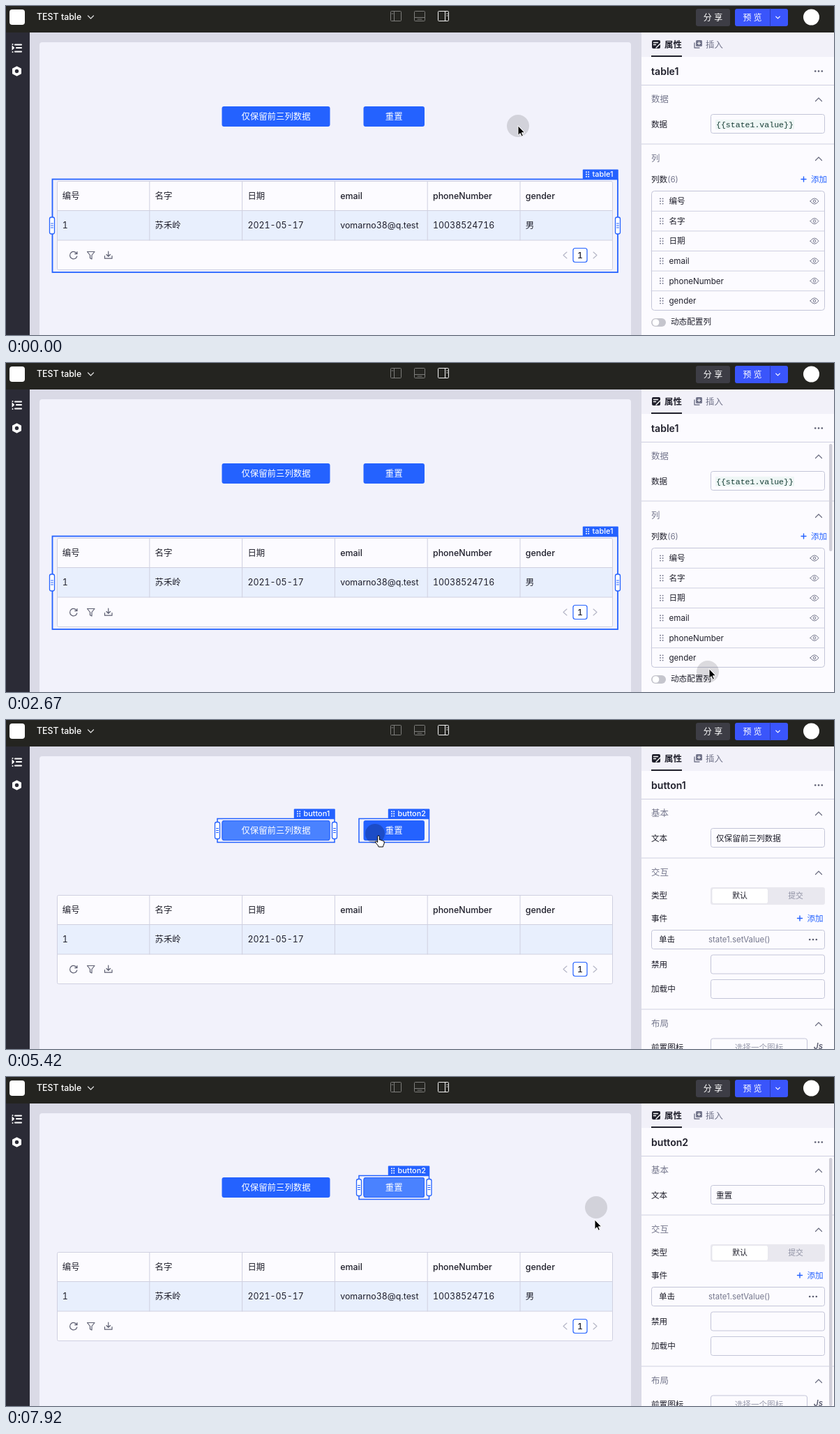
These frames come from a looping animation (1187x472 px, 8000 ms). An HTML page:

```html
<!DOCTYPE html>
<html lang="zh">
<head>
<meta charset="utf-8">
<title>TEST table</title>
<style>
html, body { margin: 0; width: 100%; height: 100%; overflow: hidden; background: #dadae6; }
svg { display: block; width: 100vw; height: 100vh; }
text { font-family: Inter, "Noto Sans CJK SC", "Noto Sans CJK", sans-serif; white-space: pre; }
.num { font-feature-settings: "tnum"; }
.mono { font-family: "Liberation Mono", monospace; }
</style>
</head>
<body>
<svg id="stage" viewBox="0 0 1187 472"></svg>
<script>
const BLUE = '#2462ff', LIGHT = '#4a82ff', INK = '#1f1f2b', GREY = '#74768c', LINE = '#cfd0e0', WHITE = '#fcfbff';
const range = n => [...Array(n).keys()];

const rect = (x, y, w, h, fill, r = 0, stroke = 'none', sw = 1, more = '') =>
  `<rect x="${x}" y="${y}" width="${w}" height="${h}" rx="${r}" fill="${fill}" stroke="${stroke}" stroke-width="${sw}" ${more}/>`;
const path = (d, stroke, sw = 1.2, fill = 'none') =>
  `<path d="${d}" stroke="${stroke}" stroke-width="${sw}" fill="${fill}" stroke-linecap="round" stroke-linejoin="round"/>`;
const line = (x1, y1, x2, y2, c = LINE) => path(`M${x1} ${y1}L${x2} ${y2}`, c, 1);
const dot = (x, y, r, fill) => `<circle cx="${x}" cy="${y}" r="${r}" fill="${fill}"/>`;
// y is the middle of the capitals
const text = (x, y, s, size = 11.6, fill = INK, weight = 400, more = '') =>
  `<text x="${x}" y="${y + size * 0.36}" font-size="${size}" fill="${fill}" font-weight="${weight}" ${more}>${s}</text>`;
const MID = 'text-anchor="middle"';
const group = (id, ...parts) => `<g id="${id}">${parts.join('')}</g>`;

const grip = (x, y, c, gap = 3.6) =>
  range(6).map(i => dot(x + (i % 2) * gap, y + ((i >> 1) - 1) * gap, 0.95, c)).join('');
const chevron = (x, y, c, dx, dy) => path(`M${x - dx} ${y - dy}l${dx} ${dy * 2}l${dx} ${-dy * 2}`, c);
const sideChevron = (x, dir) => path(`M${x - 2.5 * dir} 353l${5 * dir} 4.5l${-5 * dir} 4.5`, '#b4b5c6', 1.1);
const more = (x, y) => range(3).map(i => dot(x + (i - 1) * 4.8, y, 1.3, '#5a5c70')).join('');
const field = (y, h = 28, w = 164, x = 1010) => rect(x + .5, y + .5, w - 1, h - 1, WHITE, 3, '#c3c5d8');
const section = (y, s) => text(925, y, s, 12.4, GREY, 500) + path(`M1160.500 ${y + 2.500}l4.500 -4.500l4.500 4.500`, '#6a6c80');
const add = (x, y) => path(`M${x} ${y}h7M${x + 3.5} ${y - 3.5}v7`, BLUE, 1.4) + text(x + 14, y, '添加', 11.6, BLUE);
const handle = (x, y) => rect(x - 3.5, y - 12, 7, 24, '#fff', 2.5, BLUE, 1.3) +
  range(3).map(i => line(x - 1.5, y - 3 + i * 3, x + 1.5, y - 3 + i * 3, BLUE)).join('');
const frame = (x, y, w, h, tagW, name, sw) =>
  rect(x, y, w, h, 'none', 0, BLUE, sw) + rect(x + w - tagW + .8, y - 14, tagW, 14, BLUE, 1) +
  grip(x + w - tagW + 6, y - 7, '#fff', 3.2) + text(x + w - tagW + 14.500, y - 7, name, 10.900, '#fff', 500);

const topBar = () => rect(0, 0, 1187, 38, '#242420') +
  rect(5, 5, 22, 22, '#fff', 4) +
  text(44, 16, 'TEST table', 12.4, '#fff', 500) + chevron(121.500, 16, '#ddd', 4, 2) +
  rect(551.5, 7.5, 15, 14, 'none', 1, '#7d7d7b') + line(556.5, 8, 556.5, 21, '#7d7d7b') + line(553, 11, 555, 11, '#7d7d7b') +
  rect(585.5, 7.5, 15, 14, 'none', 1, '#7d7d7b') + line(586, 16.5, 600, 16.5, '#7d7d7b') + line(590, 19, 596, 19, '#7d7d7b') +
  rect(619.5, 7.5, 15, 14, 'none', 1, '#f2f2f2') + line(629.5, 8, 629.5, 21, '#f2f2f2') +
  line(632, 11, 633, 11, '#f2f2f2') + line(632, 14, 633, 14, '#f2f2f2') +
  rect(989, 4, 49, 25, '#3d3d45', 3) + text(1013.500, 16.500, '分 享', 12, '#fff', 400, MID) +
  rect(1045, 4, 76, 25, '#3a55fb', 3) + line(1095.5, 4, 1095.5, 29, '#2a3bb8') +
  text(1070, 16.500, '预 览', 12, '#fff', 500, MID) + chevron(1106.500, 16.500, '#fff', 2.800, 1.400) +
  dot(1154.500, 16, 11.500, '#fff');

const rail = () => rect(0, 38, 34, 434, '#2b2b36') +
  path('M13 55.500h9M15 60h7M13 65.500h9', '#fff', 2.1) + path('M9 57l3 3l-3 3z', '#fff', .6, '#fff') +
  dot(9.500, 55, 1, '#fff') + dot(9.500, 66, 1, '#fff') +
  path('M15.500 87l5.800 3.200v6.600l-5.800 3.200l-5.800 -3.200v-6.600z', '#fff', 1.4, '#fff') + dot(15.500, 93.500, 2.700, '#2b2b36');

const button = (id, x, w, s) => rect(x, 144, w, 29, BLUE, 3) +
  rect(x + .5, 144.5, w - 1, 28, LIGHT, 3, BLUE, 1, `id="${id}Glow"`) + text(x + w / 2, 158.500, s, 12.4, '#fff', 400, MID);

const heads = ['编号', '名字', '日期', 'email', 'phoneNumber', 'gender'];
const cells = ['1', '苏禾岭', '2021-05-17', 'vomarno38@q.test', '10038524716', '男'];
const colX = i => 73 + i * 132.8;
const cell = (s, i) => text(colX(i) + 7.800, 315, s, 12.4, INK, 400, 'class="num"');
const table = () => rect(73.5, 251.5, 796, 127, WHITE, 2, LINE) + rect(74, 293.5, 795, 42.5, '#e8effd') +
  line(74, 293.5, 869, 293.5) + line(74, 336, 869, 336) +
  range(5).map(i => line(colX(i + 1), 252, colX(i + 1), 336)).join('') +
  heads.map((s, i) => text(colX(i) + 7.800, 272.500, s, 12.4, INK, 500)).join('') +
  cells.slice(0, 3).map(cell).join('') +
  group('extra', ...cells.slice(3).map((s, i) => cell(s, i + 3))) +
  path('M101.500 355.500a5.200 5.200 0 1 0 .3 3.500M102 352.500v3.200h-3.200', '#5d5f72') +
  path('M116.500 352.500h10.500l-4 5v5.500l-2.500 -1.300v-4.200z', '#5d5f72') +
  path('M141.500 358.500v3.700h10.500v-3.700M146.750 352v7M144 356.500l2.750 2.750l2.750 -2.750', '#5d5f72') +
  sideChevron(801.500, -1) + sideChevron(844.500, 1) +
  rect(813, 347.500, 20, 20, '#fff', 3, BLUE, 1.2) + text(823, 357.500, '1', 12.2, INK, 500, MID + ' class="num"');

const eye = y => path(`M1153 ${y}q6 -8.400 12 0q-6 8.400 -12 0z`, '#74768c', 1) +
  `<circle cx="1159" cy="${y}" r="1.800" fill="none" stroke="#74768c"/>`;
const listRow = (s, i) => {
  const y = 280 + i * 28.600;
  return (i ? line(925, y - 14.300, 1173, y - 14.300) : '') + grip(938, y, '#74768c') + text(950.500, y, s) + eye(y);
};
const tablePanel = () => section(134, '数据') + text(925, 169.500, '数据') + field(155) +
  rect(1017, 163, 113, 14, '#eef6f5') + text(1018, 169.500, '{{state1.value}}', 11.55, '#163d35', 400, 'class="mono"') +
  line(911, 198, 1187, 198) + section(219, '列') +
  text(925, 248.500, `列数<tspan fill="${GREY}">(6)</tspan>`) + add(1140, 248.500) +
  rect(925.5, 265.5, 248, 171, WHITE, 4, '#c3c5d8') + heads.map(listRow).join('') +
  rect(925, 448, 21, 12, '#c5c5cd', 6) + dot(931.500, 454, 4.800, '#fff') + text(953, 452.500, '动态配置列');

const buttonPanel = () => section(134, '基本') + text(925, 169.500, '文本') + field(155) +
  text(1018, 169.500, '', 11.6, INK, 400, 'id="label"') + line(911, 198, 1187, 198) +
  section(219, '交互') + text(925, 252, '类型') +
  rect(1010, 240, 164, 25, '#e9e8ef', 3) + rect(1012, 241.500, 80.500, 22, '#fff', 3, '#dddde6', .6) +
  text(1052, 252.500, '默认', 10.800, INK, 500, MID) + text(1132, 252.500, '提交', 10.800, '#9092a4', 400, MID) +
  text(925, 284.500, '事件') + add(1134.500, 284.500) +
  field(301, 28, 249, 925) + text(936, 315, '单击') + text(1007, 315, 'state1.setValue()', 11.4, GREY) + more(1157, 315) +
  text(925, 350.500, '禁用') + field(336.500) + text(925, 386, '加载中') + field(372) +
  line(911, 415, 1187, 415) + section(436, '布局') +
  text(925, 470, '前置图标') + field(456.500, 28, 139) + text(1079.500, 470, '选择一个图标', 11.6, '#9a9cad', 400, MID) +
  text(1158, 468, 'Js', 11.500, '#5a5c70', 600, 'font-style="italic"');

const panel = () => rect(911, 38, 276, 434, WHITE) + rect(911, 38, 276, 35, '#f2f1f9') +
  rect(926, 49, 12, 12, INK, 2) + path('M928.500 52.500h6M928.500 55.500h3M932 60l6 -6', '#fff', 1.4) +
  text(944, 55.500, '属性', 12.4, INK, 700) + rect(925, 71, 44, 2, INK) +
  path('M987 53v7h7', GREY, 1.4) + rect(989, 49, 9, 9, GREY, 1.500) + path('M991.500 53.500h4M993.500 51.500v4', '#fff', 1.1) +
  text(1003, 55.500, '插入', 12.4, GREY) +
  text(925, 93.500, '', 14.1, INK, 600, 'id="title"') + more(1165, 93.500) + line(911, 113.5, 1187, 113.5) +
  group('tablePanel', tablePanel()) + group('buttonPanel', buttonPanel()) +
  rect(1180, 116, 4.500, 154, '#cfced8', 2.200, 'none', 1, 'id="bar"');

const stage = document.getElementById('stage');
stage.innerHTML = rect(0, 0, 1187, 472, '#dadae6') + rect(48, 52, 848, 440, '#f2f2fb', 4) +
  rail() + table() + button('b1', 309.500, 155, '仅保留前三列数据') + button('b2', 512.500, 87.500, '重置') +
  group('tableFrame', frame(66.500, 248.500, 810.500, 133.500, 51, 'table1', 1.800), handle(66, 315), handle(877, 315)) +
  group('b1Frame', frame(303, 141.500, 168, 34, 59, 'button1', 1.5)) + group('b1Handles', handle(303, 158.500), handle(471, 158.500)) +
  group('b2Frame', frame(506, 141.500, 100.500, 34, 59.500, 'button2', 1.5)) + group('b2Handles', handle(506, 158.500), handle(606.500, 158.500)) +
  panel() + topBar() + '<circle id="halo"/>' +
  group('arrow', path('M0 0V13.500L3.200 10.600L5.300 15.200L7.400 14.200L5.400 9.800H9.400Z', '#fff', 1, '#000')) +
  group('hand', path('M-1.300 9V1.200a1.300 1.300 0 0 1 2.600 0V6q2.400 -.8 2.600 .8q2.200 -.6 2.400 .9q2 -.3 2 1.300c0 4 -1.800 4.500 -1.800 7H.2C-.5 13 -4 11 -4.600 8.600q.8 -1.600 3.300 .4z', '#000', 1, '#fff'));

const el = {};
stage.querySelectorAll('[id]').forEach(e => el[e.id] = e);
const show = (id, on) => el[id].style.display = on ? '' : 'none';
const clamp = v => Math.max(0, Math.min(1, v));

// pointer path: tick (1/12 s), x, y
const way = [
  [0, 734, 172], [5, 734, 172], [7, 870, 300], [9, 970, 406], [11, 921, 423], [12, 909, 427], [14, 908, 440],
  [18, 930, 452], [23, 1140, 452], [27, 1020, 450], [30, 1006, 443], [31, 1006, 443], [32, 1008, 439],
  [35, 900, 240], [38, 700, 75], [41, 500, 85], [44, 406, 150], [47, 404, 158], [50, 404, 158], [51, 408, 156],
  [56, 408, 156], [60, 480, 190], [63, 529, 163], [64, 529, 163], [65, 534, 166], [77, 534, 166], [80, 650, 196],
  [82, 795, 209], [83, 810, 215], [86, 880, 232], [90, 846, 187], [94, 846, 187], [95, 844, 205]
];
function pointer(k) {
  const i = Math.max(1, way.findIndex(p => p[0] >= k));
  const [a, b] = [way[i - 1], way[i]], f = clamp((k - a[0]) / (b[0] - a[0]));
  return [a[1] + (b[1] - a[1]) * f, a[2] + (b[2] - a[2]) * f];
}
const inside = ([x, y], left, right) => x > left && x < right && y > 141 && y < 176;
const press = { 51: 10, 52: 9, 53: 13, 65: 14, 66: 10, 67: 13 };

function draw(k) {
  const pos = pointer(k), trail = pointer(k - 1);
  const over1 = inside(pos, 303, 471), over2 = inside(pos, 506, 607);
  const picked = k < 53 ? 'table1' : k < 67 ? 'button1' : 'button2';
  const onTable = picked === 'table1', on1 = picked === 'button1', on2 = picked === 'button2';

  show('tableFrame', onTable);
  show('tablePanel', onTable);
  show('buttonPanel', !onTable);
  show('b1Frame', over1 || on1);
  show('b1Handles', on1);
  show('b2Frame', over2 || on2);
  show('b2Handles', on2);
  show('extra', k < 54 || k > 67);
  show('bar', (k >= 8 && k < 46) || k >= 93);
  el.bar.setAttribute('height', onTable ? 154 : 356);
  el.b1Glow.style.opacity = k < 68 ? clamp((k - 44) / 3) : 0;
  el.b2Glow.style.opacity = clamp((k - 66) / 3);
  el.title.textContent = picked;
  el.label.textContent = on1 ? '仅保留前三列数据' : '重置';

  el.halo.setAttribute('cx', trail[0]);
  el.halo.setAttribute('cy', trail[1]);
  el.halo.setAttribute('r', press[k] || 16);
  el.halo.style.opacity = press[k] ? 0.22 : 0.13;
  const hand = over1 || over2;
  show('hand', hand);
  show('arrow', !hand);
  el[hand ? 'hand' : 'arrow'].setAttribute('transform', `translate(${pos})`);
}

const start = performance.now();
function loop() {
  const t = (performance.now() - start) % 8000;
  draw(Math.floor(t * 0.012 + 0.01));
  requestAnimationFrame(loop);
}
loop();
</script>
</body>
</html>
```
